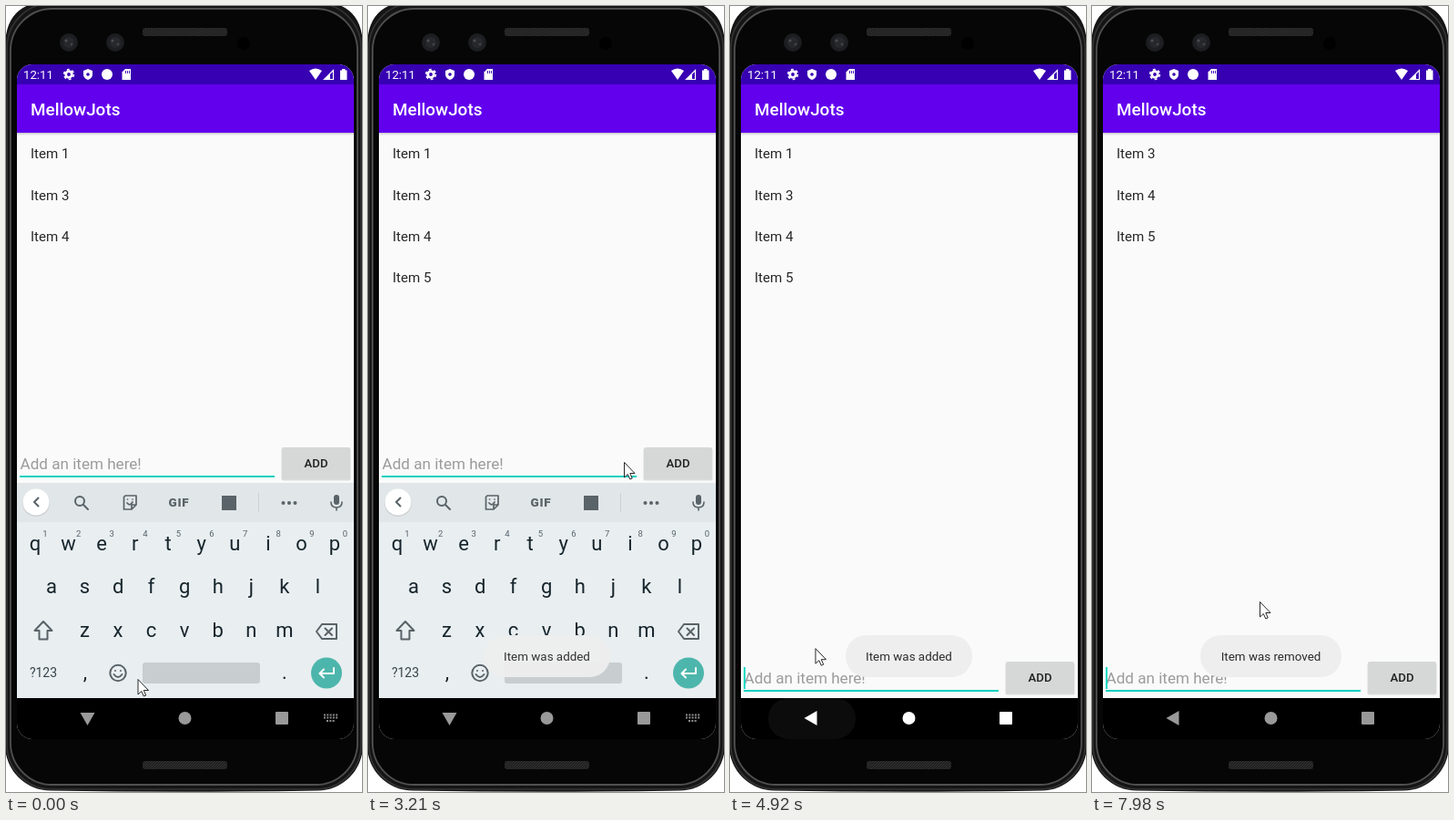
An HTML page that plays this animation: 391 px wide and 862 px high, repeating every 8 s.

```html
<!DOCTYPE html>
<html lang="en">
<head>
<meta charset="utf-8">
<title>To-do list demo</title>
<style>
  html, body { margin: 0; width: 100%; height: 100%; overflow: hidden; background: #fff; }
  svg { display: block; width: 391px; height: 862px; font-family: Roboto, sans-serif; }
  .mid { text-anchor: middle; }
  .medium { font-weight: 500; }
  .line { fill: none; stroke: #596368; stroke-width: 2; stroke-linejoin: round; stroke-linecap: round; }
  .icon { fill: #596368; }
  #letters { font-size: 22px; fill: #16252c; }
  #digits { font-size: 9.5px; fill: #56636a; }
  #items { font-size: 15.1px; fill: #262626; }
</style>
</head>
<body>
<svg viewBox="0 0 391 862">
  <defs>
    <clipPath id="screen"><rect x="12" y="64" width="370" height="740" rx="17"/></clipPath>
    <clipPath id="buttonClip"><rect x="303" y="484" width="75" height="35" rx="2"/></clipPath>
    <linearGradient id="shade" x2="0" y2="1">
      <stop stop-opacity=".2"/><stop offset="1" stop-opacity="0"/>
    </linearGradient>
    <pattern id="mesh" width="3" height="3" patternUnits="userSpaceOnUse">
      <rect width="3" height="3" fill="#2c2c2c"/><path d="M0 3L3 0" stroke="#1b1b1b"/>
    </pattern>
    <g id="lens">
      <circle r="10" fill="#1d1e21"/><circle r="6" fill="#26282c"/>
      <circle cx="-3" cy="-2" r="1.5" fill="#4a4e55"/><circle cx="3" cy="2" r="1.3" fill="#43474d"/>
    </g>
  </defs>

  <path d="M-1 45Q-1-5 49-5H342Q392-5 392 45V811A50 50 0 0 1 342 860.500Q195 863 49 860.500A50 50 0 0 1-1 811Z" fill="#151515"/>
  <rect x="1" y="-3" width="389" height="862" rx="49" fill="none" stroke="#343434" stroke-width="1.5"/>
  <rect x="5" y="3" width="381" height="851" rx="46" fill="#060606" stroke="#505050" stroke-width="1.800"/>
  <rect x="150" y="24" width="93" height="9" rx="3" fill="url(#mesh)"/>
  <rect x="150" y="828" width="93" height="9" rx="3" fill="url(#mesh)"/>
  <use href="#lens" x="69" y="40"/><use href="#lens" x="120" y="40"/>
  <circle cx="261" cy="41" r="7"/>

  <g clip-path="url(#screen)">
    <rect x="12" y="64" width="370" height="740" fill="#fafafa"/>
    <rect x="12" y="139" width="370" height="3" fill="url(#shade)"/>
    <rect x="12" y="64" width="370" height="22" fill="#3700b3"/>
    <rect x="12" y="86" width="370" height="53" fill="#6200ee"/>
    <text x="27" y="120" font-size="18.9" class="medium" fill="#fff">MellowJots</text>
    <g fill="#fff">
      <text x="19" y="80" font-size="13.2">12:11</text>
      <circle cx="69" cy="75" r="3.3" fill="none" stroke="#fff" stroke-width="2.8"/>
      <circle cx="69" cy="75" r="5.3" fill="none" stroke="#fff" stroke-width="1.8" stroke-dasharray="2.8 2.75"/>
      <path d="M90 69L95 71V75Q95 79 90 81Q85 79 85 75V71Z"/>
      <circle cx="90" cy="75" r="1.8" fill="#3700b3"/>
      <circle cx="111" cy="75" r="6"/>
      <path d="M131 69H137V81H127.500V72.500Z"/>
      <path d="M131.500 71V74M133.500 71V74M135.500 71V74" stroke="#3700b3" stroke-width=".9"/>
      <path d="M333 71Q340 66 347 71L340 81Z"/>
      <path d="M349.500 80.500H359.500V70.500Z" fill="none" stroke="#fff" stroke-width="1.200"/>
      <path d="M349 81L356 74V81Z"/>
      <path d="M367 70.500H369V69H372.500V70.500H374.500V81H367Z"/>
    </g>
    <g id="items"></g>

    <rect x="12" y="759" width="370" height="45"/>
    <g id="entry">
      <text id="field" x="15.500" y="508.400" font-size="17.1"></text>
      <rect x="15" y="515" width="280" height="2" fill="#0cd0c0"/>
      <rect id="caret" y="490" width="2" height="24" fill="#03dac5"/>
      <rect x="302.500" y="485" width="76" height="35.500" rx="2" opacity=".12"/>
      <rect x="303" y="484" width="75" height="35" rx="2" fill="#d6d7d7"/>
      <circle id="ripple" cx="358" cy="507" clip-path="url(#buttonClip)"/>
      <text x="340.500" y="506" font-size="13.2" class="medium mid" fill="#222">ADD</text>
    </g>

    <g id="keyboard">
      <rect x="12" y="523" width="370" height="236" fill="#e9eef1"/>
      <rect x="12" y="523" width="370" height="43" fill="#e1e6e9"/>
      <circle cx="33" cy="545" r="15" opacity=".1"/>
      <circle cx="33" cy="544" r="14.500" fill="#fff"/>
      <path id="chevron" class="line" d="M2.500-4.500L-2 0L2.500 4.500"/>
      <g id="tools">
        <circle cx="81" cy="543" r="5" class="line"/><path d="M85 547L90 552" class="line"/>
        <path d="M131 537H143V547L138 552H129.500V538.500ZM143 547H138V552M133 545Q136 549 139 544M133.500 541V541M139 541V541" class="line" style="stroke-width:1.700"/>
        <text x="190" y="549" font-size="13.5" font-weight="900" letter-spacing=".8" class="mid icon">GIF</text>
        <rect x="237" y="537" width="16" height="16" class="icon"/>
        <path d="M277.500 534V555" stroke="#cbd1d4"/>
        <g class="icon"><circle cx="304.500" cy="545" r="2"/><circle cx="311" cy="545" r="2"/><circle cx="317.500" cy="545" r="2"/></g>
      </g>
      <g id="words" class="mid" font-size="17" fill="#637077">
        <text x="94" y="551">I</text><text x="195.500" y="551">is</text><text x="297" y="551">and</text>
        <path d="M142.500 533V556M249.500 533V556" stroke="#cbd1d4"/>
      </g>
      <rect x="360" y="536" width="6" height="11" rx="3" class="icon"/>
      <path d="M357 544Q357 550 363 550T369 544M363 550V553" class="line" style="stroke-width:1.600"/>

      <g id="letters" class="mid"></g>
      <g id="digits" class="mid"></g>
      <path d="M41 675L50.500 685H45.500V694.500H36.500V685H31.500Z" class="line"/>
      <path d="M347 678H363V694H347L341 686ZM350.500 682.500L358 690M358 682.500L350.500 690" class="line"/>
      <text x="41" y="736" font-size="14" class="mid" fill="#36444b">?123</text>
      <circle cx="123" cy="731.500" r="8.700" class="line"/>
      <path d="M118.500 733Q123 739 127.500 733M120 729V729M126 729V729" class="line"/>
      <rect x="150" y="720" width="129" height="23" rx="3" fill="#c8cdd0"/>
      <circle cx="352" cy="731.500" r="17" fill="#4db6ac"/>
      <path d="M360 726V732H345M349 727.500L344.500 732L349 736.500" class="line" style="stroke:#fff"/>
    </g>

    <rect id="navRipple" x="42" y="759" width="96" height="45" rx="22" fill="#fff"/>
    <g id="nav">
      <path id="back" d="M-8 0L6-8V8Z"/>
      <circle cx="196.500" cy="781" r="7"/>
      <rect x="296" y="774" width="14" height="14" rx="1"/>
      <path id="switcher" d="M349 777.500H365M349 780.500H365M352 784H362" fill="none" stroke="#8c8c8c" stroke-width="2" stroke-dasharray="2 1.300"/>
    </g>
    <g id="toast">
      <rect y="690" height="46" rx="22.500" fill="#eee"/>
      <text x="196.500" y="718" font-size="13.400" class="mid" fill="#2b2b2b"></text>
    </g>
  </g>
  <path id="mouse" d="M.5 .5V17L4.300 13.500L6.800 19L9.200 18L6.800 12.500H12Z" fill="#fff" stroke="#111" stroke-width=".9"/>
</svg>
<script>
const LOOP = 8000, ROW = 45.3;
const $ = id => document.getElementById(id);
const set = (node, attrs) => { for (const k in attrs) node.setAttribute(k, attrs[k]); };
const ramp = (t, a, b) => Math.min(1, Math.max(0, (t - a) / (b - a)));
const ease = p => p * p * (3 - 2 * p);

const bursts = [[280, 280, 1], [560, 980, 4], [1410, 2390, 8], [2540, 3450, 8],
  [3600, 4510, 8], [4660, 5590, 8], [6160, 7130, 8], [7270, 7980, 6]];

// Pointer path: time, x, y
const path = [[1410, 144.5, 738], [1980, 300, 420], [2390, 354, 508], [2850, 354, 508],
  [3190, 281, 500], [3450, 110, 738], [3900, 95, 743], [4660, 95, 743],
  [5500, 72, 165], [6300, 72, 165], [7130, 73, 420], [7900, 184, 653]];

function text(parent, x, y, content) {
  const node = document.createElementNS("http://www.w3.org/2000/svg", "text");
  set(node, { x, y });
  node.textContent = content;
  return $(parent).appendChild(node);
}

[["qwertyuiop", 32, 597], ["asdfghjkl", 50, 644], ["zxcvbnm", 86.5, 692]].forEach(([keys, x, y]) =>
  [...keys].forEach((key, i) => text("letters", x + 36.55 * i, y, key)));
[..."1234567890"].forEach((digit, i) => text("digits", 43 + 36.6 * i, 581.5, digit));
text("letters", 87, 738, ",");
text("letters", 306, 738, ".");
const rows = [1, 3, 4, 5].map(n => text("items", 27, 0, "Item " + n));

function captured(t) {
  let last = 0;
  for (const [start, end, count] of bursts) {
    if (t < start) break;
    const step = (end - start) / (count - 1) || 1;
    last = start + step * Math.min(count - 1, Math.floor((t - start) / step + 1e-6));
  }
  return last;
}

function pointer(t) {
  const i = path.findIndex(p => p[0] > t);
  if (i === 0) return path[0].slice(1);
  if (i < 0) return path[path.length - 1].slice(1);
  const [a, b] = [path[i - 1], path[i]], p = ease(ramp(t, a[0], b[0]));
  return [a[1] + (b[1] - a[1]) * p, a[2] + (b[2] - a[2]) * p];
}

function typed(t) {
  if (t < 560 || t > 2780) return "";
  return t < 1650 ? "Item ".slice(0, 1 + Math.floor((t - 560) / 105)) : "Item 5";
}

function drawList(t) {
  const lift = ROW * ease(ramp(t, 6220, 6480));
  rows.forEach((row, i) => set(row, { y: 167.3 + ROW * i - (i ? lift : 0) }));
  set(rows[0], { opacity: 1 - ramp(t, 6000, 6165) });
  set(rows[3], { opacity: ramp(t, 2740, 2930) });
}

function drawEntry(t) {
  const value = typed(t), field = $("field");
  field.textContent = value.replace(" ", "\u00a0") || "Add an item here!";
  set(field, { fill: value ? "#262626" : "#9b9b9b" });
  const blink = (t + 420) % 1000 < 500;
  set($("caret"), {
    x: value ? 15 + field.getComputedTextLength() : 15,
    opacity: +(t < 1410 ? t >= 280 : blink)
  });
  set($("entry"), { transform: `translate(0 ${t < 4450 ? 0 : 235})` });
  set($("ripple"), {
    r: 36 * Math.max(0, (t - 2450) / 220),
    opacity: t < 2500 ? 0 : .14 * (1 - ramp(t, 2720, 2930))
  });
}

function drawKeyboard(t) {
  const hide = ramp(t, 4395, 4580), suggest = t >= 560 && t < 1650;
  set($("keyboard"), { opacity: 1 - hide, transform: `translate(0 ${61 * hide})` });
  set($("tools"), { opacity: +!suggest });
  set($("words"), { opacity: +suggest });
  set($("chevron"), { transform: `translate(33 544) scale(${suggest ? -1 : 1} 1)` });
}

function drawNav(t) {
  const light = Math.round(153 + 102 * (ramp(t, 4200, 4350) - ramp(t, 7000, 7500)));
  set($("nav"), { fill: `rgb(${light},${light},${light})` });
  set($("back"), { transform: `translate(89.5 781) rotate(${-90 * (1 - ramp(t, 4395, 4583))})` });
  set($("switcher"), { opacity: +(t < 4400) });
  set($("navRipple"), { opacity: .17 * (ramp(t, 4200, 4400) - ramp(t, 4520, 4900)) });
}

function drawToast(t) {
  const removed = t > 6000, box = $("toast");
  const width = removed ? 155 : 139;
  set(box, {
    opacity: removed ? ramp(t, 6060, 6310) : ramp(t, 2950, 3200) - ramp(t, 5150, 5450)
  });
  set(box.children[0], { x: 196.5 - width / 2, width });
  box.children[1].textContent = removed ? "Item was removed" : "Item was added";
}

function frame(now) {
  const t = captured(now % LOOP);
  drawList(t);
  drawEntry(t);
  drawKeyboard(t);
  drawNav(t);
  drawToast(t);
  set($("mouse"), { transform: `translate(${pointer(t)})` });
  requestAnimationFrame(frame);
}
requestAnimationFrame(frame);
</script>
</body>
</html>
```
